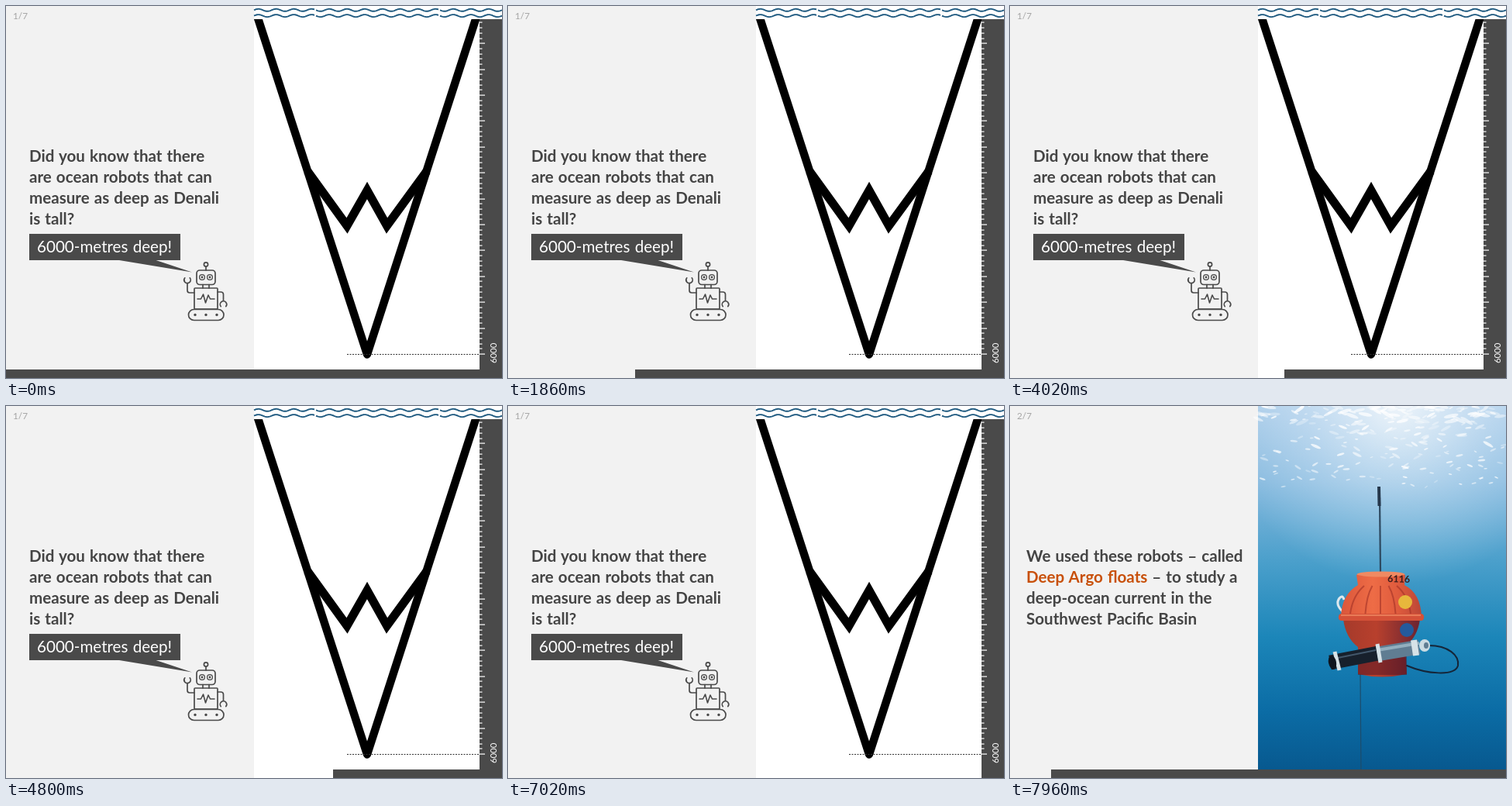
These frames come from a looping animation (640 px wide and 480 px high, 8 s). An HTML page with a canvas:

```html
<!DOCTYPE html>
<html lang="en">
<head>
<meta charset="utf-8">
<title>Ocean robots</title>
<style>
  html, body { margin: 0; width: 100%; height: 100%; overflow: hidden; background: #f2f2f2; }
  canvas, svg { position: absolute; left: 0; top: 0; width: 640px; height: 480px; }
  text { font-family: Lato, Carlito, sans-serif; font-size: 20.6px; word-spacing: 1px; fill: #444; white-space: pre; }
  .head { font-weight: 700; }
  .page { font-size: 11.8px; fill: #a6a6a6; }
  .light { fill: #fff; }
  .depth { font-size: 11.3px; fill: #fff; }
  .accent { fill: #c8500a; }
  .serial { font-size: 12.5px; font-weight: 700; fill: #3a1d1c; }
</style>
</head>
<body>
<canvas id="stage" width="640" height="480"></canvas>
<svg viewBox="0 0 640 480">
  <g id="intro">
    <text class="page" x="9" y="17">1/7</text>
    <text class="head">
      <tspan x="30" y="201">Did you know that there</tspan><tspan x="30" y="228">are ocean robots that can</tspan><tspan x="30" y="255">measure as deep as Denali</tspan><tspan x="30" y="282">is tall?</tspan>
    </text>
    <text class="light" x="40" y="318">6000-metres deep!</text>
    <text class="depth" transform="translate(632.5 461) rotate(-90)">6000</text>
  </g>
  <g id="floats" visibility="hidden">
    <text class="page" x="9" y="17">2/7</text>
    <text class="head">
      <tspan x="21" y="201">We used these robots – called</tspan><tspan class="accent" x="21" y="228">Deep Argo floats</tspan><tspan> – to study a</tspan><tspan x="21" y="255">deep-ocean current in the</tspan><tspan x="21" y="282">Southwest Pacific Basin</tspan>
    </text>
    <text class="serial" x="487" y="227" transform="rotate(2 487 227)">6116</text>
  </g>
</svg>
<script>
const LOOP = 8000, CUT = 7350, STEP = 60, STEP_PX = 5.28, LAST_STEP = 117;
const PAPER = '#f2f2f2', DARK = '#4a4a4a';

const stage = document.getElementById('stage').getContext('2d');
const introText = document.getElementById('intro');
const floatsText = document.getElementById('floats');

function makeLayer(draw) {
  const layer = document.createElement('canvas');
  layer.width = 640;
  layer.height = 480;
  draw(layer.getContext('2d'));
  return layer;
}

function rect(c, color, x, y, w, h) {
  c.fillStyle = color;
  c.fillRect(x, y, w, h);
}

function trace(c, points) {
  c.beginPath();
  points.forEach(([x, y]) => c.lineTo(x, y));
}

function line(c, color, width, points) {
  trace(c, points);
  c.strokeStyle = color;
  c.lineWidth = width;
  c.stroke();
}

function poly(c, color, points) {
  trace(c, points);
  c.fillStyle = color;
  c.fill();
}

function oval(c, color, x, y, rx, ry = rx, turn = 0) {
  c.beginPath();
  c.ellipse(x, y, rx, ry, turn, 0, 7);
  c.fillStyle = color;
  c.fill();
}

function curve(c, color, width, path) {
  c.strokeStyle = color;
  c.lineWidth = width;
  c.stroke(new Path2D(path));
}

function shade(c, from, to, stops) {
  const g = c.createLinearGradient(...from, ...to);
  stops.forEach(([at, color]) => g.addColorStop(at, color));
  return g;
}

function random(seed) {
  return () => (seed = seed * 16807 % 2147483647) / 2147483647;
}

function drawWaves(c) {
  for (const y0 of [5.3, 12.6]) {
    for (const left of [240, 400, 560]) {
      const points = [];
      for (let x = Math.max(left, 320); x <= Math.min(left + 158.5, 640); x++) {
        points.push([x, y0 + 1.5 * Math.sin((x - left) / 160 * 14 * Math.PI)]);
      }
      line(c, '#1f5a80', 1.9, points);
    }
  }
}

function drawRuler(c) {
  rect(c, DARK, 611, 17, 29, 463);
  const gap = 33.4 / 5;
  for (let i = 0; i < 65; i++) {
    const y = Math.round(449 - i * gap);
    if (y > 17) rect(c, '#fff', 611, y - 0.5, i % 5 ? 3.5 : 7, 1.2);
  }
}

function drawTrench(c) {
  c.save();
  c.beginPath();
  c.rect(320, 17, 291, 463);
  c.clip();
  c.lineJoin = 'round';
  line(c, '#000', 10.5, [[322.2, 7], [466, 449.5], [609.3, 7]]);
  c.lineJoin = 'miter';
  line(c, '#000', 11, [[389, 213], [440, 283.5], [466, 238], [491.5, 283.5], [543, 213]]);
  c.restore();
  c.setLineDash([2, 1.5]);
  line(c, '#333', 1, [[440, 449.5], [611, 449.5]]);
  c.setLineDash([]);
}

function drawRobot(c) {
  const box = (x, y, w, h, r) => {
    c.beginPath();
    c.roundRect(x, y, w, h, r);
    c.stroke();
  };
  const ring = (x, y, r, from = 0, to = 2 * Math.PI) => {
    c.beginPath();
    c.arc(x, y, r, from, to);
    c.stroke();
  };
  c.strokeStyle = DARK;
  c.lineWidth = 1.7;
  c.lineJoin = c.lineCap = 'round';
  ring(258, 333.5, 2.6);
  box(246, 341, 24, 18.5, 4);
  box(243, 364, 30, 27, 1);
  box(235.5, 391.5, 45.5, 14, 7);
  ring(234, 353.5, 4.2, -0.7, Math.PI + 0.7);
  ring(280.5, 385, 4.2, Math.PI - 0.7, 2 * Math.PI + 0.7);
  curve(c, DARK, 1.7, 'M258 336.5V341 M254 359.5V364 M262 359.5V364 M243 370H237Q234 370 234 367V358 M273 369H277Q280.5 369 280.5 372V380');
  c.lineWidth = 1.3;
  for (const x of [253, 263]) {
    ring(x, 350, 3.4);
    oval(c, DARK, x, 350, 1.4);
  }
  line(c, DARK, 1.6, [[247, 378], [251.5, 378], [254.5, 372], [257.5, 383], [261, 373], [263.5, 378], [269, 378]]);
  for (const x of [244, 258, 272]) oval(c, DARK, x, 398.5, 1.7);
}

function drawIntro(c) {
  rect(c, PAPER, 0, 0, 320, 480);
  rect(c, '#fff', 320, 0, 320, 480);
  drawWaves(c);
  drawTrench(c);
  drawRuler(c);
  rect(c, DARK, 30, 294, 195, 34);
  poly(c, DARK, [[143, 327.5], [192, 327.5], [240, 343.5]]);
  drawRobot(c);
}

function drawWater(c) {
  rect(c, shade(c, [0, 0], [0, 480], [
    [0, '#a9cbe8'], [0.2, '#86b9de'], [0.42, '#4a9fcb'],
    [0.62, '#1c86b9'], [0.82, '#0b6ca5'], [1, '#07568c']
  ]), 320, 0, 320, 480);
  const glow = c.createRadialGradient(500, 0, 10, 500, 0, 230);
  glow.addColorStop(0, 'rgba(255,255,255,.75)');
  glow.addColorStop(0.5, 'rgba(235,245,255,.35)');
  glow.addColorStop(1, 'rgba(220,240,255,0)');
  rect(c, glow, 320, 0, 320, 240);
  const rnd = random(71);
  for (let i = 0; i < 230; i++) {
    const x = 320 + rnd() * 320;
    const y = 105 * rnd() ** 1.7;
    const size = 2 + rnd() * 9 * (1 - y / 125);
    oval(c, `rgba(255,255,255,${0.25 + rnd() * 0.55})`, x, y, size, size * 0.22 + 0.3, (rnd() - 0.5) * 1.2);
  }
}

function drawFloat(c) {
  line(c, '#1d4c6b', 1.2, [[452, 345], [453, 480]]);
  line(c, '#2d4960', 2.2, [[477, 118], [478, 215]]);
  line(c, '#26384c', 4, [[476, 104], [476.5, 129]]);

  curve(c, '#dde8ee', 3, 'M430 266Q419 256 425 248Q429 243 431 250');
  const lower = shade(c, [430, 0], [525, 0], [[0, '#a53a2b'], [0.45, '#b8402d'], [1, '#6f2632']]);
  c.fillStyle = lower;
  c.fill(new Path2D('M430 275H529Q526 298 510 310L512 346Q480 353 449 346V311Q433 299 430 275Z'));
  rect(c, 'rgba(70,15,35,.45)', 449, 318, 63, 29);

  c.fillStyle = shade(c, [425, 0], [533, 0], [[0, '#d9553a'], [0.4, '#ee6c46'], [0.7, '#df5b3d'], [1, '#b84536']]);
  c.fill(new Path2D('M447 218Q478 210 510 218L509 231Q530 242 531 272H427Q428 243 449 231Z'));
  oval(c, '#f08a62', 478.5, 217, 31, 3.5);
  for (const side of [-30, -15, 0, 15, 30]) {
    curve(c, 'rgba(160,48,38,.6)', 2, `M${478 + side * 0.7} 232Q${478 + side * 1.2} 245 ${478 + side * 1.3} 268`);
  }
  c.beginPath();
  c.roundRect(424, 268, 110, 9, 4);
  c.fillStyle = '#d45138';
  c.fill();
  line(c, '#f18a62', 1.5, [[427, 270], [530, 270]]);
  oval(c, '#e7b83c', 510, 253, 9);
  oval(c, '#245a9c', 512, 289, 9);
}

function drawSensor(c) {
  c.lineCap = 'round';
  curve(c, '#152538', 2, 'M540 309C566 309 580 322 578 335C574 349 538 346 512 335');
  c.lineCap = 'butt';
  line(c, '#17202c', 19, [[413, 331], [475, 319]]);
  line(c, '#42566a', 2, [[418, 326], [472, 315]]);
  line(c, '#607d92', 19, [[474, 320], [528, 311]]);
  line(c, '#93afbe', 4, [[474, 315], [528, 306]]);
  line(c, '#d6e2e7', 5, [[419, 317], [425, 341]]);
  line(c, '#d6e2e7', 5, [[474, 307], [478, 331]]);
  line(c, '#d6e2e7', 8, [[521, 302], [524, 322]]);
  oval(c, '#cbdce3', 535, 309, 7, 8);
  oval(c, '#607d92', 537, 309, 3, 4);
  oval(c, '#0e151f', 416, 331, 5, 9, -0.2);
}

function drawPhotoSlide(c) {
  rect(c, PAPER, 0, 0, 320, 480);
  drawWater(c);
  drawFloat(c);
  drawSensor(c);
}

const intro = makeLayer(drawIntro);
const floats = makeLayer(drawPhotoSlide);
const start = performance.now();

function render() {
  const t = (performance.now() - start) % LOOP;
  const second = t >= CUT;
  const step = second
    ? Math.max(0, Math.floor((t - CUT - 10) / STEP))
    : Math.min(LAST_STEP, Math.floor(t / STEP));
  const x = Math.round(step * STEP_PX);
  stage.drawImage(second ? floats : intro, 0, 0);
  rect(stage, DARK, x, 469, 640 - x, 11);
  introText.setAttribute('visibility', second ? 'hidden' : 'visible');
  floatsText.setAttribute('visibility', second ? 'visible' : 'hidden');
  requestAnimationFrame(render);
}
render();
</script>
</body>
</html>
```
